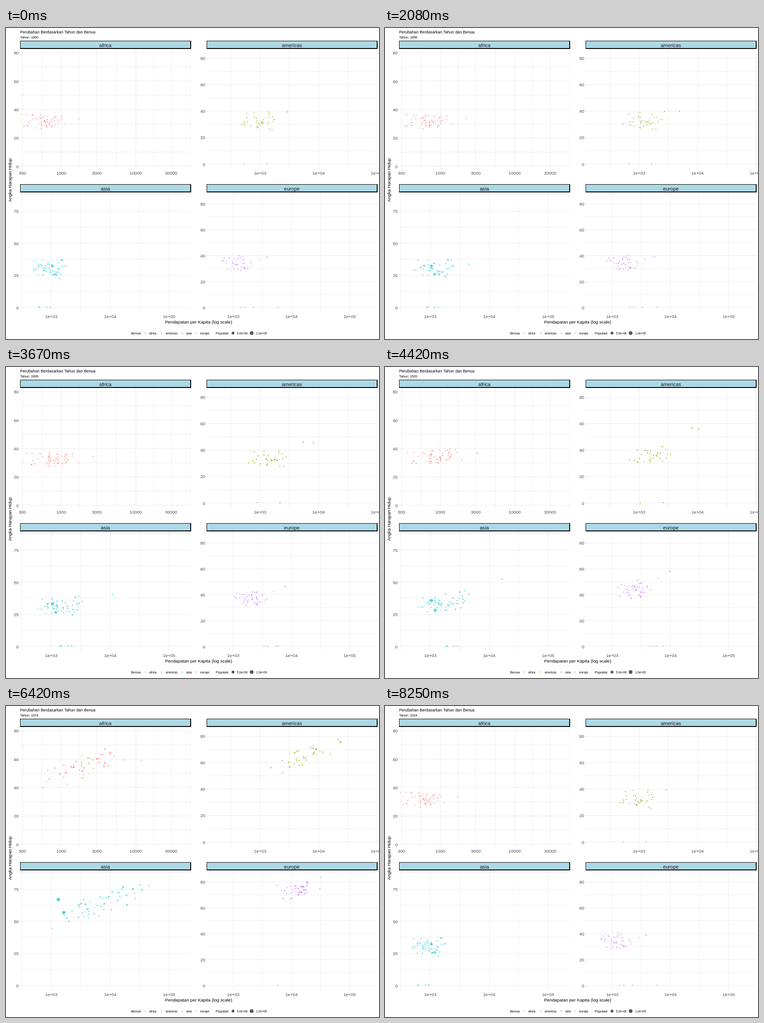
An HTML page for the animation above (8330 ms loop, 820 px wide and 683 px high).

```html
<!DOCTYPE html>
<html lang="id">
<head>
<meta charset="utf-8">
<title>Perubahan Berdasarkan Tahun dan Benua</title>
<style>
  html, body { margin: 0; width: 100%; height: 100%; overflow: hidden; background: #fff; }
  svg { display: block; font-family: "Liberation Sans", Arial, sans-serif; }
  line, rect { shape-rendering: crispEdges; }
</style>
</head>
<body>
<svg id="stage" width="820" height="683" viewBox="0 0 820 683"></svg>
<script>
const stage = document.getElementById('stage');
const LOOP = 8330, LAST = 99, SPAN = 224;

// ---------- drawing helpers ----------
function add(tag, attrs) {
  const el = document.createElementNS('http://www.w3.org/2000/svg', tag);
  for (const key in attrs) el.setAttribute(key, attrs[key]);
  return stage.appendChild(el);
}
function text(str, x, y, size, fill = '#000', anchor = 'start', extra = {}) {
  const el = add('text', { x, y, 'font-size': size, fill, 'text-anchor': anchor, ...extra });
  el.textContent = str;
  return el;
}
function box(x, y, width, height, fill) {
  return add('rect', { x, y, width, height, fill });
}
function dot(x, y, r, color) {
  return add('circle', { cx: x, cy: y, r, fill: color, stroke: color, 'stroke-width': 0.6,
    'fill-opacity': 0.65, 'stroke-opacity': 0.65 });
}

// ---------- random numbers and easing ----------
let seed = 11;
function rand() {
  seed = (seed + 0x6D2B79F5) | 0;
  let t = Math.imul(seed ^ (seed >>> 15), 1 | seed);
  t = (t + Math.imul(t ^ (t >>> 7), 61 | t)) ^ t;
  return ((t ^ (t >>> 14)) >>> 0) / 4294967296;
}
const spread = () => (rand() + rand() - 1) * 2.45;
const mix = (a, b, f) => a + (b - a) * f;
const age = year => (year - 1800) / SPAN;
const logistic = (year, turn) => 1 / (1 + Math.exp((turn - year) / 15));
// Income creeps up for a century and a half, then jumps around 1960.
const income = year => 0.35 * age(year) + 0.65 * logistic(year, 1960);

// ---------- panels ----------
// x1000 and decade give the log axis; zero, step and unit the life axis.
// from and to: mean x, sd x, mean y, sd y of the cloud; turn: year life expectancy takes off.
// stars: notable countries; pow replaces the usual income curve by a power of time.
const panels = [
  {
    name: 'africa', color: '#F8766D', left: 31, top: 28, x1000: 121.5, decade: 163.5, thirds: true,
    zero: 303.5, step: -62.3, unit: 20,
    count: 52, from: [85, 22, 208, 9], to: [208, 52, 103, 14], turn: 1960,
    stars: [{ from: [161, 199], to: [345, 100], turn: 1953, r: [1, 1] }]
  },
  {
    name: 'americas', color: '#7CAE00', left: 441, top: 28, x1000: 558.5, decade: 128.5,
    zero: 298.5, step: -58.1, unit: 20,
    count: 32, from: [562, 19, 205, 10], to: [698, 28, 81, 7], turn: 1951,
    stars: [
      { from: [618, 184], to: [771, 70], turn: 1925, pow: 1.2, r: [1, 1.2] },
      { from: [578, 185], to: [796, 76], turn: 1922, pow: 1.3, r: [1, 2.4] }
    ],
    flat: [524, 574], shift: 95
  },
  {
    name: 'asia', color: '#00BFC4', left: 31, top: 343, x1000: 99.5, decade: 129.5,
    zero: 613.5, step: -70.5, unit: 25,
    count: 47, from: [92, 18, 529, 9], to: [237, 54, 405, 12], turn: 1961,
    stars: [
      { from: [102, 523], to: [262, 394], turn: 1957, pow: 10, r: [2.4, 4.3] },
      { from: [109, 541], to: [213, 415], turn: 1962, pow: 7, r: [2.1, 4.3] },
      { from: [122, 510], to: [305, 375], turn: 1950, r: [1.3, 2] },
      { from: [95, 520], to: [362, 390], turn: 1925, pow: 0.8, r: [1, 1] }
    ],
    flat: [72, 74, 89, 97], shift: 160
  },
  {
    name: 'europe', color: '#C77CFF', left: 441, top: 343, x1000: 499.5, decade: 128,
    zero: 613.5, step: -56.8, unit: 20,
    count: 43, from: [514, 21, 513, 9], to: [690, 25, 391, 8], turn: 1940,
    stars: [
      { from: [574, 503], to: [699, 382], turn: 1923, pow: 1.4, r: [1.3, 1.7] },
      { from: [525, 528], to: [684, 402], turn: 1941, r: [1.6, 2] }
    ],
    flat: [517, 525, 544], shift: 170, still: 598
  }
];

function drawPanel({ name, left, top, x1000, decade, thirds, zero, step, unit }) {
  const right = left + 376, ceil = top + 18, floor = top + 281;
  const grid = (x1, y1, x2, y2, stroke) => add('line', { x1, y1, x2, y2, stroke });
  const column = (x, stroke) => {
    const inside = x > left && x < right;
    const px = Math.floor(x) + 0.5;
    if (inside) grid(px, ceil, px, floor, stroke);
    return inside;
  };
  const major = '#EBEBEB', minor = '#EFEFEF';

  for (let i = 0, y; (y = zero + step * i / 2) > ceil; i++) {
    const py = Math.floor(y) + 0.5;
    grid(left, py, right, py, i % 2 ? minor : major);
    if (i % 2 === 0) text(unit * i / 2, left - 3, y + 4, 9.7, '#4D4D4D', 'end');
  }

  const breaks = [];
  for (let v = 100; v <= 1e6; v *= 10) breaks.push(...(thirds ? [v, 3 * v] : [v]));
  const place = v => x1000 + decade * Math.log10(v / 1000);
  breaks.forEach((v, i) => {
    const x = place(v);
    if (i) column((place(breaks[i - 1]) + x) / 2, minor);
    const label = thirds ? v : v.toExponential().replace('+', '+0');
    if (column(x, major)) text(label, x, top + 293.7, 9.7, '#4D4D4D', 'middle');
  });

  box(left, top, 376, 18, '#000');
  box(left + 1, top + 1, 373, 15, '#ADD8E6');
  text(name, left + 187.5, top + 13.5, 11, '#1A1A1A', 'middle');
}

// ---------- countries ----------
const movers = [];
function mover(color, at, r, until = Infinity) {
  movers.push({ at, r, until, el: dot(0, 0, 1, color) });
}

function addCountry({ color, from, to, turn }) {
  const u = spread(), v = spread();
  const rank = 0.85 * u + 0.53 * spread();
  const x0 = from[0] + from[1] * u, y0 = from[2] + from[3] * v;
  const x1 = to[0] + to[1] * rank;
  const y1 = to[2] + to[3] * (-0.5 * rank + 0.85 * spread());
  const takeoff = turn - 6 * rank + 7 * spread();
  const phase = rand() * 6.28, flu = 28 * rand() ** 2, r = 0.75 + 0.3 * rand();
  mover(color, year => {
    const dip = flu * Math.max(0, 1 - Math.abs(year - 1918) / 1.6);
    return [
      mix(x0, x1, income(year)) + 2 * Math.sin(year / 17 + phase),
      mix(y0, y1, logistic(year, takeoff)) + 1.5 * Math.sin(year / 8 + phase) + dip
    ];
  }, [r, r + 0.9 * rand() ** 2]);
}

function addStar(color, { from, to, turn, pow, r }) {
  mover(color, year => [
    mix(from[0], to[0], pow ? age(year) ** pow : income(year)),
    mix(from[1], to[1], logistic(year, turn))
  ], r);
}

for (const p of panels) {
  drawPanel(p);
  for (let i = 0; i < p.count; i++) addCountry(p);
  p.stars.forEach(s => addStar(p.color, s));
  // Countries without a life expectancy slide along zero until records begin.
  const base = p.zero - 0.5;
  (p.flat || []).forEach(x =>
    mover(p.color, year => [x + p.shift * age(year) ** 1.5, base], [0.9, 1.2], 1950));
  if (p.still) mover(p.color, () => [p.still, base], [0.9, 0.9], 1996);
}

// ---------- titles and legend ----------
text('Perubahan Berdasarkan Tahun dan Benua', 31, 12, 8.76);
const yearText = text('', 31, 23.3, 7.3);
text('Pendapatan per Kapita (log scale)', 423.5, 649, 9.75, '#000', 'middle');
text('Angka Harapan Hidup', 0, 0, 9.75, '#000', 'middle', { transform: 'translate(12 334) rotate(-90)' });

function legend(x, r, color, label, gap) {
  dot(x, 670, r, color);
  text(label, x + gap, 672.7, 6.4);
}
text('Benua', 275, 672.7, 7.3);
[306, 342, 387.5, 418].forEach((x, i) => legend(x, 1, panels[i].color, panels[i].name, 9));
text('Populasi', 461, 672.7, 7.3);
legend(499, 2.8, '#000', '5.0e+08', 8.5);
legend(540, 3.8, '#000', '1.0e+09', 10);

// ---------- animation ----------
function draw(step) {
  const gone = SPAN * step / LAST;
  yearText.textContent = 'Tahun: ' + Math.floor(1800 + gone + 0.2);
  // The closing step already shows the first year's points.
  const year = step === LAST ? 1800 : 1800 + gone;
  for (const { el, at, r, until } of movers) {
    const [x, y] = at(year);
    el.setAttribute('cx', x.toFixed(2));
    el.setAttribute('cy', y.toFixed(2));
    el.setAttribute('r', mix(r[0], r[1], age(year) ** 2).toFixed(2));
    el.setAttribute('visibility', year < until ? 'visible' : 'hidden');
  }
}

const start = performance.now();
let shown = -1;
function tick() {
  const t = (performance.now() - start) % LOOP;
  const step = Math.min(LAST, Math.floor((t / 10 + 0.5) * 3 / 25));
  if (step !== shown) draw(shown = step);
  requestAnimationFrame(tick);
}
tick();
</script>
</body>
</html>
```
